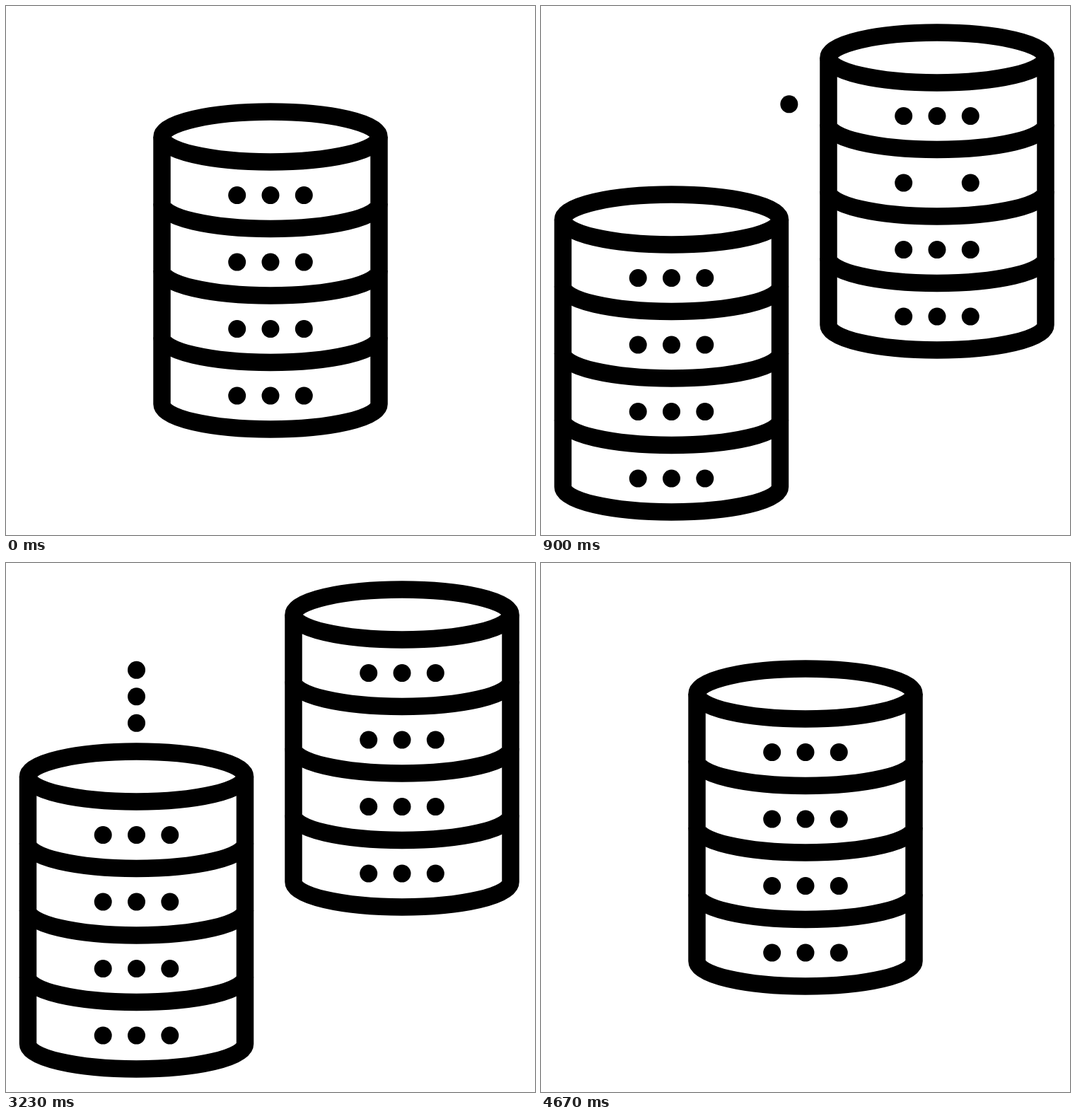
Animation of 748 by 748 pixels, one loop 5.53 s. Source, as an HTML page with a canvas:

```html
<!DOCTYPE html>
<html lang="en">
<head>
<meta charset="utf-8">
<title>Database transfer</title>
<style>
  html, body { margin: 0; width: 100%; height: 100%; overflow: hidden; background: #fff; }
  canvas { display: block; width: 100vw; height: 100vh; }
</style>
</head>
<body>
<canvas id="stage" width="748" height="748"></canvas>
<script>
const ctx = document.getElementById('stage').getContext('2d');
const LOOP = 5530, FPS = 30;
const HOME = { x: 374, y: 185 };
const RX = 153.5, RY = 35.4, ROW = 94.5, LINE = 24.5, DOT = 12.5;

// Resting offsets of the separated cylinders
const FRONT = { x: -189.5, y: 117 };
const BACK = { x: 186, y: -112 };

// First frames of the blink sweeps; each row is off for ROW_OFF frames
const ROW_OFF = 5;
const FRONT_SWEEPS = [68, 98];
const BACK_SWEEPS = [18, 68, 118];

// Dotted link: left along the top, then down
const LINK = { x0: 365, y0: 138.8, x1: 184.5, length: 269.5, gap: 37.5, speed: 2.02 };

const clamp = v => Math.min(1, Math.max(0, v));
const span = (n, from, to) => clamp((n - from) / (to - from));
const smooth = x => x * x * (3 - 2 * x);

// cubic-bezier(x1, 0, x2, 1)
function bezier(x, x1, x2) {
  let lo = 0, hi = 1;
  for (let i = 0; i < 30; i++) {
    const s = (lo + hi) / 2, r = 1 - s;
    if (3 * r * r * s * x1 + 3 * r * s * s * x2 + s * s * s < x) lo = s; else hi = s;
  }
  return smooth(lo);
}

function dot(x, y) {
  ctx.beginPath();
  ctx.arc(x, y, DOT, 0, Math.PI * 2);
  ctx.fill();
}

function hiddenRow(n, sweeps) {
  const start = sweeps.find(s => n >= s && n < s + 4 * ROW_OFF);
  return start === undefined ? -1 : Math.floor((n - start) / ROW_OFF);
}

function cylinder(offset, amount, hidden) {
  const x = HOME.x + offset.x * amount;
  const y = HOME.y + offset.y * amount;
  ctx.beginPath();
  ctx.ellipse(x, y, RX, RY, 0, Math.PI, Math.PI * 2);
  ctx.ellipse(x, y + 4 * ROW, RX, RY, 0, 0, Math.PI);
  ctx.closePath();
  ctx.fillStyle = '#fff';
  ctx.fill();
  ctx.stroke();
  ctx.fillStyle = '#000';
  for (let row = 0; row < 4; row++) {
    ctx.beginPath();
    ctx.ellipse(x, y + row * ROW, RX, RY, 0, 0, Math.PI);
    ctx.stroke();
    for (let col = -1; col <= 1; col++) {
      if (col || row !== hidden) dot(x + col * 47.3, y + 82.6 + row * ROW);
    }
  }
}

function link(n) {
  if (n <= 20 || n >= 118) return;
  const head = LINK.length * smooth(span(n, 20, 70));
  const tail = LINK.length * smooth(span(n, 60, 120));
  const corner = LINK.x0 - LINK.x1;
  for (let s = (LINK.speed * (n - 20)) % LINK.gap; s <= head; s += LINK.gap) {
    if (s < tail) continue;
    dot(LINK.x0 - Math.min(s, corner), LINK.y0 + Math.max(0, s - corner));
  }
}

function draw(n) {
  const amount = n < 120
    ? smooth(span(n, 0, 20))
    : 1 - bezier(span(n, 120, 140), 0.167, 0.667);
  ctx.fillStyle = '#fff';
  ctx.fillRect(0, 0, 748, 748);
  ctx.strokeStyle = '#000';
  ctx.lineWidth = LINE;
  if (amount > 0.0001) cylinder(BACK, amount, hiddenRow(n, BACK_SWEEPS));
  cylinder(FRONT, amount, hiddenRow(n, FRONT_SWEEPS));
  link(n);
}

const begin = performance.now();
function tick() {
  const t = (performance.now() - begin) % LOOP;
  draw(Math.floor((t + 4) * FPS / 1000));
  requestAnimationFrame(tick);
}
tick();
</script>
</body>
</html>
```
